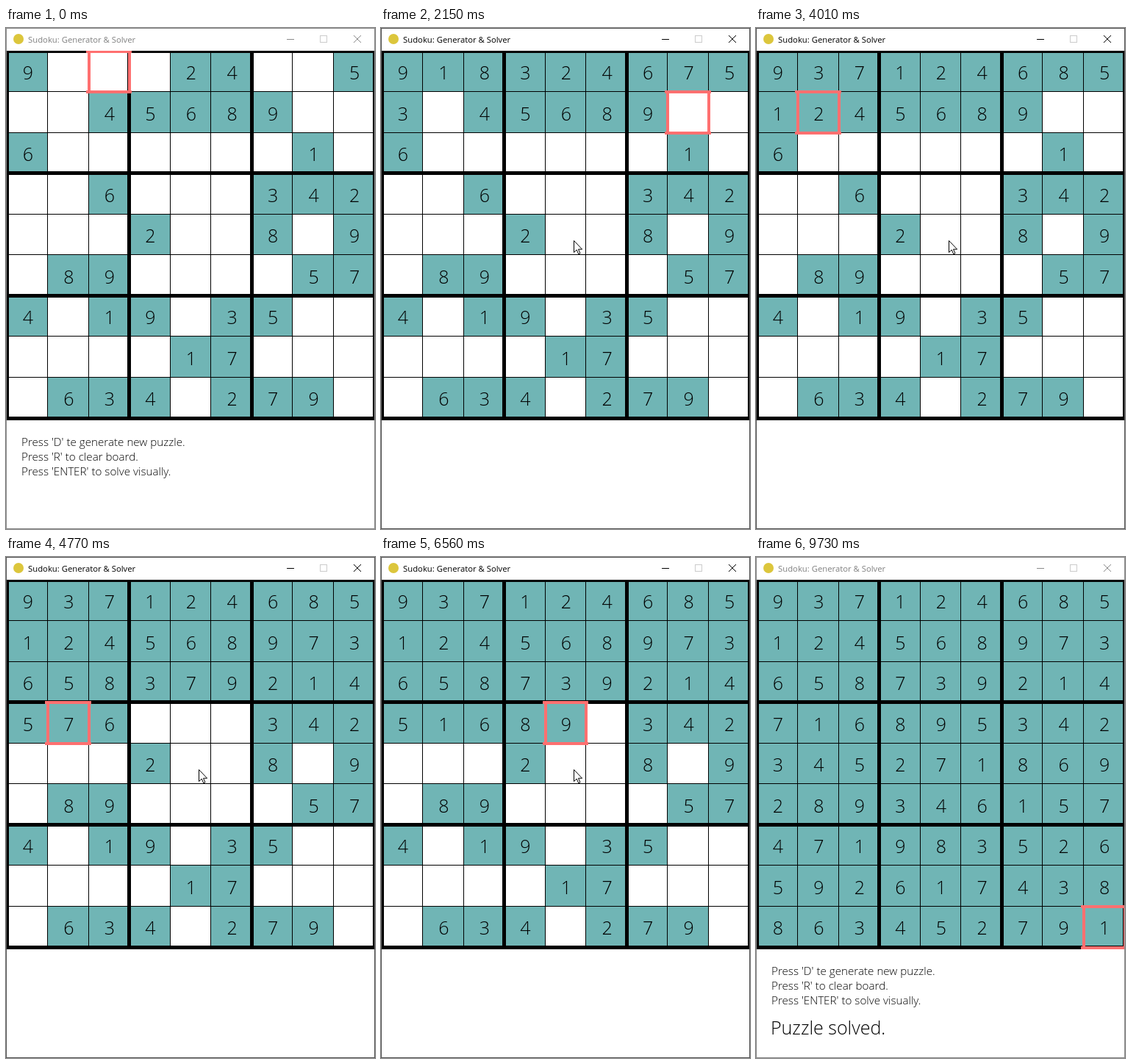
These frames come from a looping animation (502x682 px, 9.83 s). An HTML page:

```html
<!DOCTYPE html>
<html lang="en">
<head>
<meta charset="utf-8">
<title>Sudoku: Generator &amp; Solver</title>
<style>
html, body { margin: 0; width: 100%; height: 100%; overflow: hidden; background: #fff; }
svg { display: block; }
text { font-family: "Open Sans", "Noto Sans", sans-serif; font-weight: 300; }
.digit { font-size: 25px; text-anchor: middle; }
.hint { font-size: 15.2px; }
.solved { font-size: 25px; }
.caption { font-size: 11.3px; font-weight: 400; }
.crisp { shape-rendering: crispEdges; }
</style>
</head>
<body>
<svg id="stage" width="502" height="682" viewBox="0 0 502 682"></svg>
<script>
const LOOP = 9830, SOLVE_AT = 830, DONE_AT = 7900;
const FOCUS_AT = 620, BLUR_AT = 9730;
const LEFT = 1, TOP = 31, SIZE = 500, CELL = SIZE / 9;
const TEAL = '#70b5b5', PINK = '#ff7070';

const PUZZLE = [
  '900024005', '004568900', '600000010',
  '006000342', '000200809', '089000057',
  '401903500', '000017000', '063402790'
].join('').split('').map(Number);

// [time, solver step] pairs, linear in between
const PACE = [
  [SOLVE_AT, 1], [2150, 40], [2220, 41], [4010, 95], [4060, 96],
  [5550, 147], [5580, 148], [6560, 176], [6590, 177],
  [7660, 215], [7690, 216], [7870, 226]
];

// Backtracking solver; every placing and clearing is one step.
function record(start) {
  const board = start.slice();
  const steps = [{ board: start, box: 2 }];
  let box = 2;
  const log = () => steps.push({ board: board.slice(), box });
  const clash = (a, b) => {
    const ra = Math.floor(a / 9), rb = Math.floor(b / 9), ca = a % 9, cb = b % 9;
    return ra === rb || ca === cb ||
      (Math.floor(ra / 3) === Math.floor(rb / 3) && Math.floor(ca / 3) === Math.floor(cb / 3));
  };
  function solve() {
    const at = board.indexOf(0);
    if (at < 0) return true;
    for (let n = 1; n <= 9; n++) {
      if (board.some((v, i) => v === n && clash(i, at))) continue;
      board[at] = n;
      box = at;
      log();
      if (solve()) return true;
      board[at] = 0;
      log();
    }
    return false;
  }
  solve();
  return steps;
}
const steps = record(PUZZLE);

const stage = document.getElementById('stage');
function add(parent, tag, attrs, text) {
  const el = document.createElementNS('http://www.w3.org/2000/svg', tag);
  set(el, attrs);
  if (text !== undefined) el.textContent = text;
  return parent.appendChild(el);
}
function set(el, attrs) {
  for (const k in attrs) el.setAttribute(k, attrs[k]);
}
const group = attrs => add(stage, 'g', attrs || {});
const show = (el, on) => el.setAttribute('visibility', on ? 'visible' : 'hidden');
const edge = k => Math.floor(k * CELL + 1e-6);

add(stage, 'rect', { width: 502, height: 682, fill: '#fff' });

// Title bar
add(stage, 'circle', { cx: 17, cy: 15, r: 7, fill: '#dcc63c' });
const caption = add(stage, 'text', { x: 30, y: 20, class: 'caption' }, 'Sudoku: Generator & Solver');
const minimize = add(stage, 'path', { d: 'M382 15.5h10', class: 'crisp' });
add(stage, 'rect', { x: 427.5, y: 10.5, width: 9, height: 9, fill: 'none', stroke: '#ccc', class: 'crisp' });
const close = add(stage, 'path', { d: 'M473 10l10 10M483 10l-10 10' });

// Board, clipped to the client area
const clip = add(add(stage, 'defs', {}), 'clipPath', { id: 'client' });
add(clip, 'rect', { x: 0, y: 0, width: 500, height: 650 });
const client = group({ transform: `translate(${LEFT} ${TOP})` });
const board = add(client, 'g', { 'clip-path': 'url(#client)' });
const bar = (parent, x, y, width, height, fill) =>
  add(parent, 'rect', { x, y, width, height, fill, class: 'crisp' });

const fills = PUZZLE.map((_, i) => {
  const c = i % 9, r = Math.floor(i / 9);
  return bar(board, edge(c), edge(r), edge(c + 1) - edge(c), edge(r + 1) - edge(r), TEAL);
});
for (let k = 0; k <= 9; k++) {
  const w = k % 3 ? 1 : 5, p = edge(k) - (w >> 1);
  bar(board, p, 0, w, SIZE, '#000');
  bar(board, 0, p, SIZE, w, '#000');
}
const digits = PUZZLE.map((_, i) => add(board, 'text', {
  x: (i % 9 + 0.5) * CELL + 1, y: 39 + Math.floor(i / 9) * CELL, class: 'digit'
}));
const marks = [0, 1, 2, 3].map(() => bar(board, 0, 0, 4, 4, PINK));

function moveMarks(cell) {
  const c = cell % 9, r = Math.floor(cell / 9);
  const from = Math.trunc(c * CELL - 3), to = Math.trunc((c + 1) * CELL + 3);
  for (let i = 0; i < 2; i++) {
    set(marks[i], { x: from, y: edge(r + i) - 1, width: to - from + 1, height: 4 });
    set(marks[i + 2], { x: edge(c + i) - 1, y: edge(r), width: 4, height: edge(r + 1) - edge(r) });
  }
}

// Messages
const hints = group();
[
  "Press 'D' te generate new puzzle.",
  "Press 'R' to clear board.",
  "Press 'ENTER' to solve visually."
].forEach((line, i) => add(hints, 'text', { x: 21, y: 569 + 20 * i, class: 'hint' }, line));
const solved = add(stage, 'text', { x: 20, y: 650, class: 'solved' }, 'Puzzle solved.');

const frame = add(stage, 'rect', {
  x: 0.5, y: 0.5, width: 501, height: 681, fill: 'none', class: 'crisp'
});
const pointer = add(stage, 'path', {
  d: 'M.5 .5V16.5L4.2 13L6.8 18.8L9 17.8L6.5 12.2H11.6Z', fill: '#fff', stroke: '#000'
});

function stepAt(t) {
  if (t < SOLVE_AT) return 0;
  for (let i = 1; i < PACE.length; i++) {
    const [t0, s0] = PACE[i - 1], [t1, s1] = PACE[i];
    if (t < t1) return Math.floor(s0 + (s1 - s0) * (t - t0) / (t1 - t0) + 1e-6);
  }
  return steps.length - 1;
}

const clamp = v => Math.min(1, Math.max(0, v));
function pointerAt(t) {
  if (t < 1100) {
    const u = Math.pow(1 - clamp((t - 60) / 540), 2);
    return [262 + 176 * u, 291 + 391 * u];
  }
  const v = clamp((t - 8890) / 300), e = v * v * (3 - 2 * v);
  return [262 + 176 * e, 289 + 393 * e];
}

let drawn = -1;
function render(t) {
  const n = stepAt(t);
  if (n !== drawn) {
    const { board: values, box } = steps[n];
    values.forEach((v, i) => {
      show(fills[i], v);
      digits[i].textContent = v || '';
    });
    moveMarks(box);
    drawn = n;
  }
  const active = t >= FOCUS_AT && t < BLUR_AT;
  caption.setAttribute('fill', active ? '#000' : '#808080');
  for (const el of [minimize, close]) el.setAttribute('stroke', active ? '#000' : '#8a8a8a');
  frame.setAttribute('stroke', active ? '#555' : '#8a8a8a');
  show(hints, t < SOLVE_AT || t >= DONE_AT);
  show(solved, t >= DONE_AT);
  const [x, y] = pointerAt(t);
  show(pointer, t >= 60 && t < 9190);
  pointer.setAttribute('transform', `translate(${Math.round(x)} ${Math.round(y)})`);
}

const began = performance.now();
function tick() {
  render((performance.now() - began) % LOOP);
  requestAnimationFrame(tick);
}
render(0);
requestAnimationFrame(tick);
</script>
</body>
</html>
```
